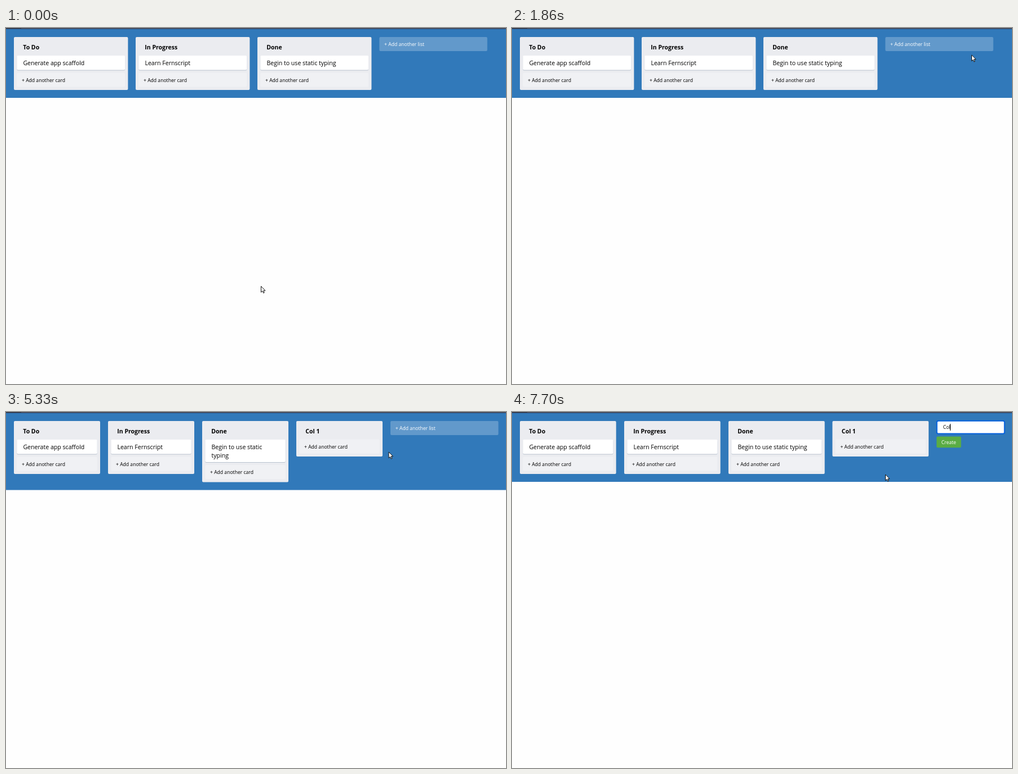
Animation, 887 px wide and 632 px high, one loop 8000 ms. Source, as an HTML page:

```html
<!DOCTYPE html>
<html lang="en">
<head>
<meta charset="utf-8">
<title>Task board</title>
<style>
  html, body { margin: 0; width: 100%; height: 100%; overflow: hidden; background: #fefefe; }
  svg { display: block; width: 887px; height: 632px; }
  text { font: 10.6px "Open Sans", "Noto Sans", sans-serif; fill: #000; white-space: pre; }
  .title { font-weight: 700; font-size: 10.5px; }
  .small { font-size: 8.6px; }
  .light { fill: #fff; }
  .board { fill: #3179ba; }
  .column { fill: #ebecf0; }
  .card { fill: #fff; }
  .shade { fill: #b9c3cf; }
  .add { fill: #fff; fill-opacity: .24; }
  .hover { fill-opacity: .32; }
  .pointer { fill: #fff; stroke: #111; stroke-width: 1; stroke-linejoin: round; }
</style>
</head>
<body>
<svg id="stage" viewBox="0 0 887 632"></svg>
<script>
const LOOP = 8000;
const stage = document.getElementById('stage');

function add(parent, tag, attrs = {}, content = '') {
  const node = document.createElementNS('http://www.w3.org/2000/svg', tag);
  for (const key in attrs) node.setAttribute(key, attrs[key]);
  node.textContent = content;
  return parent.appendChild(node);
}
const box = (parent, cls, x, y, width, height, rx = 2) =>
  add(parent, 'rect', { class: cls, x, y, width, height, rx });
const label = (parent, cls, x, y, content) =>
  add(parent, 'text', { class: cls, x, y }, content);
const show = (node, visible) => node.setAttribute('visibility', visible ? 'inherit' : 'hidden');

function column(parent, x, width, title, lines) {
  const cardHeight = lines.length ? 11 + 14.5 * lines.length : 0;
  const buttonY = lines.length ? 54 + cardHeight : 48.5;
  box(parent, 'column', x, 16, width, buttonY + 14.5 + 16 - 16);
  label(parent, 'title', x + 16.3, 37.5, title);
  if (lines.length) {
    box(parent, 'shade', x + 5.3, 50, width - 10.6, cardHeight);
    box(parent, 'card', x + 5.3, 49, width - 10.6, cardHeight);
  }
  lines.forEach((line, i) => label(parent, '', x + 16.4, 66 + 14.6 * i, line));
  box(parent, 'add', x + 5.3, buttonY, width - 10.6, 25);
  label(parent, 'small', x + 14, buttonY + 16, '+ Add another card');
}

function board(xs, width, height, doneLines) {
  const group = add(stage, 'g');
  box(group, 'board', 0, 2, 887, height - 2, 0);
  const content = [
    ['To Do', ['Generate app scaffold']],
    ['In Progress', ['Learn Fernscript']],
    ['Done', doneLines],
    ['Col 1', []]
  ];
  xs.forEach((x, i) => column(group, x, width, ...content[i]));
  return group;
}

function listButton(x) {
  const group = add(stage, 'g');
  const face = box(group, 'add', x, 16, 191.5, 25);
  label(group, 'small light', x + 8.8, 32, '+ Add another list');
  return { group, face };
}

const oneLine = ['Begin to use static typing'];
const boards = [
  board([14, 230, 446], 202.4, 124, oneLine),
  board([14, 181, 348, 515], 153, 138.5, ['Begin to use static', 'typing']),
  board([14, 199, 384, 568.4], 170.7, 124, oneLine)
];
const buttons = [listButton(662.3), listButton(682)];

box(stage, '', 0, 0, 887, 1, 0).style.fill = '#55545c';
box(stage, '', 0, 1, 887, 1, 0).style.fill = '#2d4468';
box(stage, '', 0, 0, 27, 1, 0).style.fill = '#38373c';

const form = add(stage, 'g');
add(form, 'rect', { x: .5, y: 15.8, width: 120, height: 22.6, rx: 2.5,
  fill: '#fff', stroke: '#0560dd', 'stroke-width': 2 });
const typed = label(form, 'small', 11.6, 30.3, '');
const caret = add(form, 'rect', { y: 21, width: 1, height: 12, fill: '#000' });
box(form, '', 0, 43.5, 43.5, 19.7).style.fill = '#5aac44';
label(form, 'small light', 8.5, 56.8, 'Create');

const arrow = add(stage, 'path', { class: 'pointer',
  d: 'M.5 .5V11.2L3 8.9L4.7 12.6L6.3 11.9L4.7 8.2H8Z' });
const hand = add(stage, 'path', { class: 'pointer',
  d: 'M-1.2 7V.8Q0-.9 1.2 .8V5Q2.6 4 3.3 5.4Q4.7 4.6 5.3 6Q6.6 5.6 6.8 7V10Q6.6 12 5.4 14H-1Q-3-.0 -1 14Q-2.8 11-4.4 8.4Q-4.2 6.4-1.2 9Z'.replace('Q-3-.0 -1 14', '') });

// Phases of the interface: [start, board, list button or -1, form x]
const phases = [
  [0, 0, 0, 0],
  [1980, 0, -1, 662.3],
  [5330, 1, 1, 0],
  [6800, 2, -1, 753.2]
];
// Keystrokes and caret blinks: [start, text, caret visible]
const typing = [
  [1980, '', 1], [2260, '', 0], [2630, '', 1], [3030, '', 0], [3430, '', 1],
  [3530, 'C', 1], [3630, 'Co', 1], [3700, 'Col', 1], [3800, 'Col', 0], [4200, 'Col', 1],
  [4400, 'Col ', 1], [4430, 'Col 1', 1], [4600, 'Col 1', 0], [4960, 'Col 1', 1],
  [6800, '', 1], [7300, '', 0], [7500, 'C', 1], [7560, 'Co', 1], [7700, 'Col', 1]
];
const caretX = [11, 17, 22, 24, 27, 32];
// Pointer path: [time, x, y]
const path = [
  [0, 452, 458], [30, 452, 458], [150, 440, 390], [300, 375, 235], [430, 285, 100],
  [520, 244, 62], [620, 280, 55], [830, 412, 60], [1040, 550, 42], [1230, 662, 16],
  [1290, 663, 48], [1400, 750, 56], [1530, 816, 48], [1859, 816, 48],
  [1910, 790, 32], [1970, 770, 31], [2100, 678.5, 70.5], [6129, 678.5, 70.5],
  [6130, 677.5, 70.5], [6400, 677.5, 70.5], [6600, 693, 36], [6730, 699, 28],
  [6800, 699, 28], [6930, 662, 110.5], [8000, 662, 110.5]
];

const current = (list, t) => list.filter(entry => entry[0] <= t).pop();

function pointerAt(t) {
  const i = Math.max(1, path.findIndex(p => p[0] > t));
  const [t0, x0, y0] = path[i - 1], [t1, x1, y1] = path[i];
  const k = (t - t0) / (t1 - t0);
  return [x0 + (x1 - x0) * k, y0 + (y1 - y0) * k];
}

function render(t) {
  const [, boardIndex, buttonIndex, formX] = current(phases, t);
  const [x, y] = pointerAt(t);
  const left = buttonIndex === 1 ? 682 : 662.3;
  const over = buttonIndex >= 0 && x > left && x < left + 191.5 && y > 16 && y < 41;

  boards.forEach((node, i) => show(node, i === boardIndex));
  buttons.forEach(({ group, face }, i) => {
    show(group, i === buttonIndex);
    face.classList.toggle('hover', over);
  });

  show(form, formX > 0);
  if (formX) {
    const [, text, caretOn] = current(typing, t);
    form.setAttribute('transform', `translate(${formX})`);
    typed.textContent = text;
    caret.setAttribute('x', caretX[text.length] + Math.floor(formX) - formX);
    show(caret, caretOn);
  }

  show(arrow, !over);
  show(hand, over);
  for (const node of [arrow, hand]) node.setAttribute('transform', `translate(${x} ${y})`);
}

function tick() {
  render(performance.now() % LOOP);
  requestAnimationFrame(tick);
}
tick();
</script>
</body>
</html>
```
